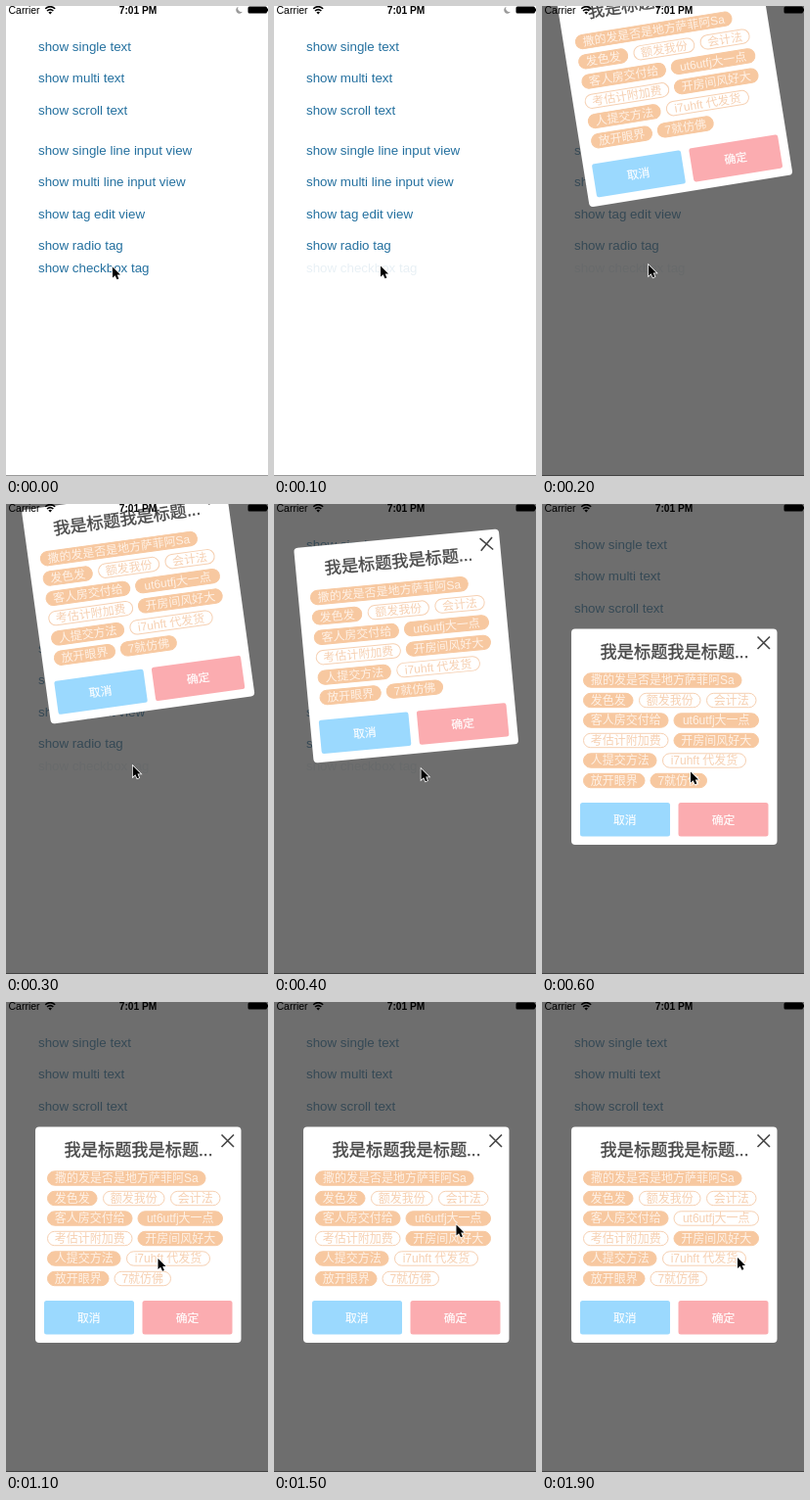
Recreate the animation shown at these times as an HTML page. Size 268 by 480 pixels, loop 2000 ms.

```html
<!DOCTYPE html>
<html lang="zh">
<head>
<meta charset="utf-8">
<title>Tag dialog</title>
<style>
html, body { margin: 0; width: 100%; height: 100%; overflow: hidden; background: #fff; }
svg { display: block; width: 100vw; height: 100vh; }
text { font-family: "Liberation Sans", "Noto Sans CJK SC", "Noto Sans CJK", sans-serif; }
.mid { text-anchor: middle; }
.link { font-size: 13.35px; fill: #24709f; }
.title { font-size: 17.2px; fill: #484848; stroke: #484848; stroke-width: .35; }
.tag rect { fill: #f7c8a0; stroke: #f7c8a0; }
.tag text { font-size: 12px; fill: #fef1e6; }
.tag.off rect { fill: #fff; stroke: #f6d0b2; }
.tag.off text { fill: #f6d0b2; }
.btn { font-size: 11.8px; fill: #fff; stroke: #fff; stroke-width: .15; }
</style>
</head>
<body>
<svg id="stage" viewBox="0 0 268 480">
  <rect width="268" height="480" fill="#fff"/>
  <g id="links"></g>
  <rect y="479" width="268" height="1" fill="#999"/>
  <path id="moon" d="M237.5 .8a3.6 3.6 0 1 0 4.5 5a3.6 3.6 0 0 1 -4.5 -5z" opacity=".4"/>
  <rect id="dim" width="268" height="480" fill="#000" opacity=".57"/>
  <g id="dialog">
    <rect x="30" y="127.5" width="210.5" height="220.5" rx="4" fill="#fff"/>
    <text class="title mid" x="135.5" y="157">我是标题我是标题...</text>
    <path d="M220.5 135.5l12.5 12.5M233 135.5l-12.5 12.5" stroke="#444" stroke-width="1.6"/>
    <g id="tags"></g>
    <rect x="39" y="305" width="92" height="34.5" rx="2.5" fill="#9bd9fe"/>
    <rect x="139.5" y="305" width="92" height="34.5" rx="2.5" fill="#fbacb0"/>
    <text class="btn mid" x="84.7" y="326.5">取消</text>
    <text class="btn mid" x="185.5" y="326.5">确定</text>
  </g>
  <g id="status">
    <text x="2.5" y="7.7" font-size="10.5">Carrier</text>
    <g fill="none" stroke="#000" stroke-width="1.5">
      <path d="M40.2 2.8q5 -4.4 10 0M42 5q3.2 -2.8 6.4 0"/>
    </g>
    <path d="M43.4 6.5q1.8 -1.5 3.6 0l-1.8 1.9z"/>
    <text class="mid" x="135" y="7.7" font-size="10.2" font-weight="700">7:01 PM</text>
    <rect x="247.5" y=".5" width="19.5" height="7" rx="1.5"/>
    <rect x="267" y="2.5" width="1" height="3"/>
  </g>
  <path id="cursor" d="M0 .5V11.5L2.6 9.2L4.5 13.2L6.4 12.4L4.7 8.500H8Z" stroke="#fff" stroke-width="1.5" paint-order="stroke"/>
</svg>
<script>
const NS = "http://www.w3.org/2000/svg";
const LOOP = 2000, TICK = 100;
const byId = id => document.getElementById(id);

function add(parent, name, attrs, text) {
  const el = document.createElementNS(NS, name);
  for (const key in attrs) el.setAttribute(key, attrs[key]);
  if (text) el.textContent = text;
  return parent.appendChild(el);
}

const links = [
  ["show single text", 45.7], ["show multi text", 78.4], ["show scroll text", 110.7],
  ["show single line input view", 151.8], ["show multi line input view", 184.4],
  ["show tag edit view", 216.8], ["show radio tag", 249.3], ["show checkbox tag", 272.2]
].map(([label, y]) => add(byId("links"), "text", { class: "link", x: 33, y }, label));
const pressed = links[links.length - 1];

// Each tag: label, left, right, selected
const rows = [
  [["撒的发是否是地方萨菲阿Sa", 42, 204.5, 1]],
  [["发色发", 42, 93.5, 1], ["额发我份", 99, 162.5, 0], ["会计法", 168, 219.5, 0]],
  [["客人房交付给", 42, 129.5, 1], ["ut6utfj大一点", 134.5, 222, 1]],
  [["考估计附加费", 42, 129.5, 0], ["开房间风好大", 134.5, 222, 1]],
  [["人提交方法", 42, 117.5, 1], ["i7uhft 代发货", 123, 209, 0]],
  [["放开眼界", 42, 105.5, 1], ["7就仿佛", 110.5, 169, 1]]
];
const tags = {};
rows.forEach((row, i) => {
  const y = 180 + i * 20.5;
  for (const [label, left, right, on] of row) {
    const g = add(byId("tags"), "g", { class: on ? "tag" : "tag off" });
    add(g, "rect", { x: left + .5, y: y - 7.2, width: right - left - 1, height: 14.4, rx: 7.2 });
    add(g, "text", { class: "mid", x: (left + right) / 2, y: y + 4.3 }, label);
    tags[label] = g;
  }
});

// Pointer stops: time, x, y
const stops = [
  [0, 109, 266], [200, 109, 264], [400, 150.5, 270], [600, 152, 273], [800, 152, 273],
  [1100, 155.5, 261.5], [1300, 170, 245], [1500, 186.5, 227], [1600, 185.5, 222],
  [1800, 185.5, 222], [1900, 200, 260.5], [2000, 200, 260.5]
];

function pointerAt(t) {
  const i = stops.findIndex(s => s[0] > t);
  const [t0, x0, y0] = stops[i - 1], [t1, x1, y1] = stops[i];
  const k = (t - t0) / (t1 - t0);
  return [x0 + (x1 - x0) * k, y0 + (y1 - y0) * k];
}

function draw(t) {
  const open = t >= 200;
  const s = Math.min(1, Math.max(0, (t - 192) / 350));
  const left = 1 - s ** 1.7;
  byId("dim").style.display = byId("dialog").style.display = open ? "" : "none";
  byId("dialog").setAttribute("transform", `translate(0 ${-158 * left}) rotate(${-9.12 * left} 135.2 238)`);
  byId("links").setAttribute("opacity", open ? .6 : 1);
  byId("moon").style.display = open ? "none" : "";
  pressed.setAttribute("opacity", t >= 100 ? .1 : 1);
  tags["7就仿佛"].classList.toggle("off", t >= 800);
  tags["ut6utfj大一点"].classList.toggle("off", t >= 1700);
  byId("cursor").setAttribute("transform", `translate(${pointerAt(t)})`);
}

const start = performance.now();
function loop() {
  const t = (performance.now() - start) % LOOP;
  draw(Math.floor(t / TICK) * TICK);
  requestAnimationFrame(loop);
}
loop();
</script>
</body>
</html>
```
